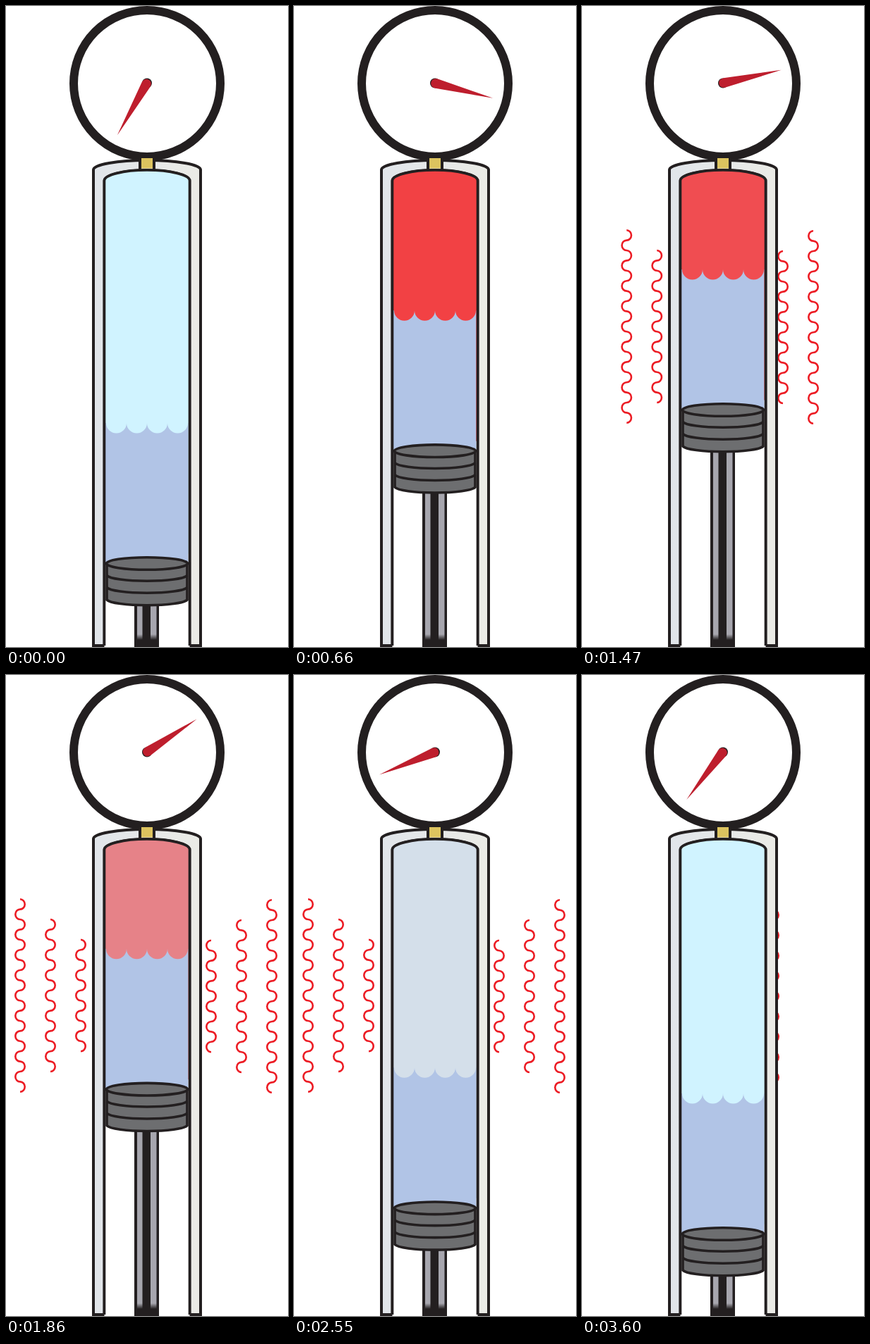
Write an HTML page that moves like this. It is 400 px wide and 910 px high and loops after 4600 ms.

```html
<!DOCTYPE html>
<html>
<head>
<meta charset="utf-8">
<style>
html, body { margin: 0; height: 100%; overflow: hidden; background: #fff; }
svg { display: block; }
</style>
</head>
<body>
<svg width="400" height="910" viewBox="0 0 400 910" fill="none" stroke="#231f20">
  <defs>
    <linearGradient id="wall">
      <stop stop-color="#e1e5ea"/><stop offset="1" stop-color="#ebebe6"/>
    </linearGradient>
    <linearGradient id="steel" gradientUnits="userSpaceOnUse" x1="0" y1="892" x2="0" y2="900">
      <stop stop-color="#a7a6ae"/><stop offset="1" stop-color="#231f20"/>
    </linearGradient>
    <clipPath id="bore"><path d="M139.5 910V248A60.5 15 0 0 1 260.5 248V910Z"/></clipPath>
  </defs>
  <g stroke="#ec1c24" stroke-width="2.6">
    <path id="left"/>
    <path id="right"/>
  </g>
  <path fill="url(#wall)" stroke-width="4" d="M124 908V232.500A76 13.500 0 0 1 276 232.500V908H260.500V248A60.500 15 0 0 0 139.500 248V908Z"/>
  <g clip-path="url(#bore)" stroke="none">
    <path fill="#fff" d="M139 230H261V910H139Z"/>
    <path id="gas"/>
    <g id="liquid"><path fill="#b1c4e6" d="M141 0V-199.500H142a14.500 14.500 0 0 0 29 0a14.500 14.500 0 0 0 29 0a14.500 14.500 0 0 0 29 0a14.500 14.500 0 0 0 29 0h.4V0Z"/></g>
  </g>
  <g id="rod" stroke="none">
    <path fill="#231f20" d="M182 560h35v350h-35z"/>
    <path fill="url(#steel)" d="M186 560h7.500v340h-7.500zM205 560h8.500v340h-8.500z"/>
  </g>
  <g id="piston" stroke-width="3.600">
    <path fill="#6d6e70" d="M143 0V51.500A57.500 9 0 0 0 257 51.500V0Z"/>
    <path d="M143 17A57.500 9 0 0 0 257 17M143 34A57.500 9 0 0 0 257 34"/>
    <ellipse cx="200" rx="57.500" ry="8.800" fill="#6d6e70"/>
  </g>
  <path stroke-width="3.600" d="M139.500 908V248A60.500 15 0 0 1 260.500 248V908"/>
  <circle cx="200" cy="110" r="104" fill="#fff" stroke-width="12"/>
  <path fill="#dcc35f" stroke-width="4" d="M190 232V216M210 216V232"/>
  <path fill="#dcc35f" stroke="none" d="M192 216h16v14.500h-16z"/>
  <circle cx="200" cy="109.500" r="7" fill="#231f20" stroke="none"/>
  <path id="needle" fill="#be1e2d" stroke="none" d="M85 0L2.500 -6.800Q-5.500 -6.500 -5.500 0Q-5.500 6.500 2.500 6.800Z"/>
</svg>
<script>
const el = id => document.getElementById(id);
const STEP = 30, LOOP = 4600, LAST = 120;

// Piecewise linear value from [step, value] pairs
function track(n, keys) {
  for (let i = 1; i < keys.length; i++) {
    const [a, u] = keys[i - 1], [b, v] = keys[i];
    if (n <= b) return u + (v - u) * (n - a) / (b - a);
  }
  return keys[keys.length - 1][1];
}

// Three heat waves, each made of half-circle bends
function waves(x, y, dir) {
  return [19, 15, 11].map((count, i) => {
    let d = `M${x + dir * 43 * i} ${y + 28.8 * i}`;
    for (let k = 0; k < count; k++)
      d += `a6.7 7.2 0 0 ${(k % 2 === 0) === (dir > 0) ? 1 : 0} 0 14.4`;
    return d;
  }).join('');
}
el('left').setAttribute('d', waves(20, 318.2, 1));
el('right').setAttribute('d', waves(377, 319.2, -1));

function needleAngle(n) {
  if (n > 30 && n < 60) {
    const rest = 1 - (n - 30) / 30;
    return 374.5 - 31.5 * (1 - rest * rest);
  }
  return track(n, [[0, 119.6], [6, 374.5], [30, 374.5], [60, 343], [75, 219], [90, 127.3]]);
}

function place(id, x, y, extra = '') {
  el(id).setAttribute('transform', `translate(${x} ${y}) ${extra}`);
}

function draw(n) {
  const y = track(n, [[0, 791.5], [30, 573.5], [60, 573.5], [90, 793.5]]);
  const heat = track(n, [[0, 0], [30, 1], [90, 0]]);
  const cold = [208, 243, 255], hot = [255, 0, 0];
  const rgb = cold.map((c, i) => Math.round(c + (hot[i] - c) * heat));

  place('piston', 0, y);
  place('liquid', 0, y);
  el('rod').setAttribute('style', `clip-path: polygon(0 ${y + 40}px, 400px ${y + 40}px, 400px 910px, 0 910px)`);
  el('rod').querySelectorAll('path').forEach((p, i) => {
    const top = y + 40, end = i ? 900 : 910;
    const bar = (x, w) => `M${x} ${top}h${w}V${end}h${-w}z`;
    p.setAttribute('d', i ? bar(186, 7.5) + bar(205, 8.5) : bar(182, 35));
  });
  el('rod').removeAttribute('style');
  el('gas').setAttribute('d', `M139 230H261V${y - 14}H139Z`);
  el('gas').setAttribute('fill', `rgb(${rgb})`);
  place('needle', 199.8, 109.5, `rotate(${needleAngle(n)})`);

  const shown = n > 30 ? 'visible' : 'hidden';
  el('left').setAttribute('visibility', shown);
  el('right').setAttribute('visibility', shown);
  place('left', track(n, [[30, 118], [60, 0], [90, 0], [120, 120]]), 0);
  place('right', -track(n, [[30, 133.5], [60, 0], [90, 0], [120, 105]]), 0);
}

const start = performance.now();
function tick() {
  const t = (performance.now() - start) % LOOP;
  draw(Math.min(LAST, Math.floor(t / STEP)));
  requestAnimationFrame(tick);
}
tick();
</script>
</body>
</html>
```
